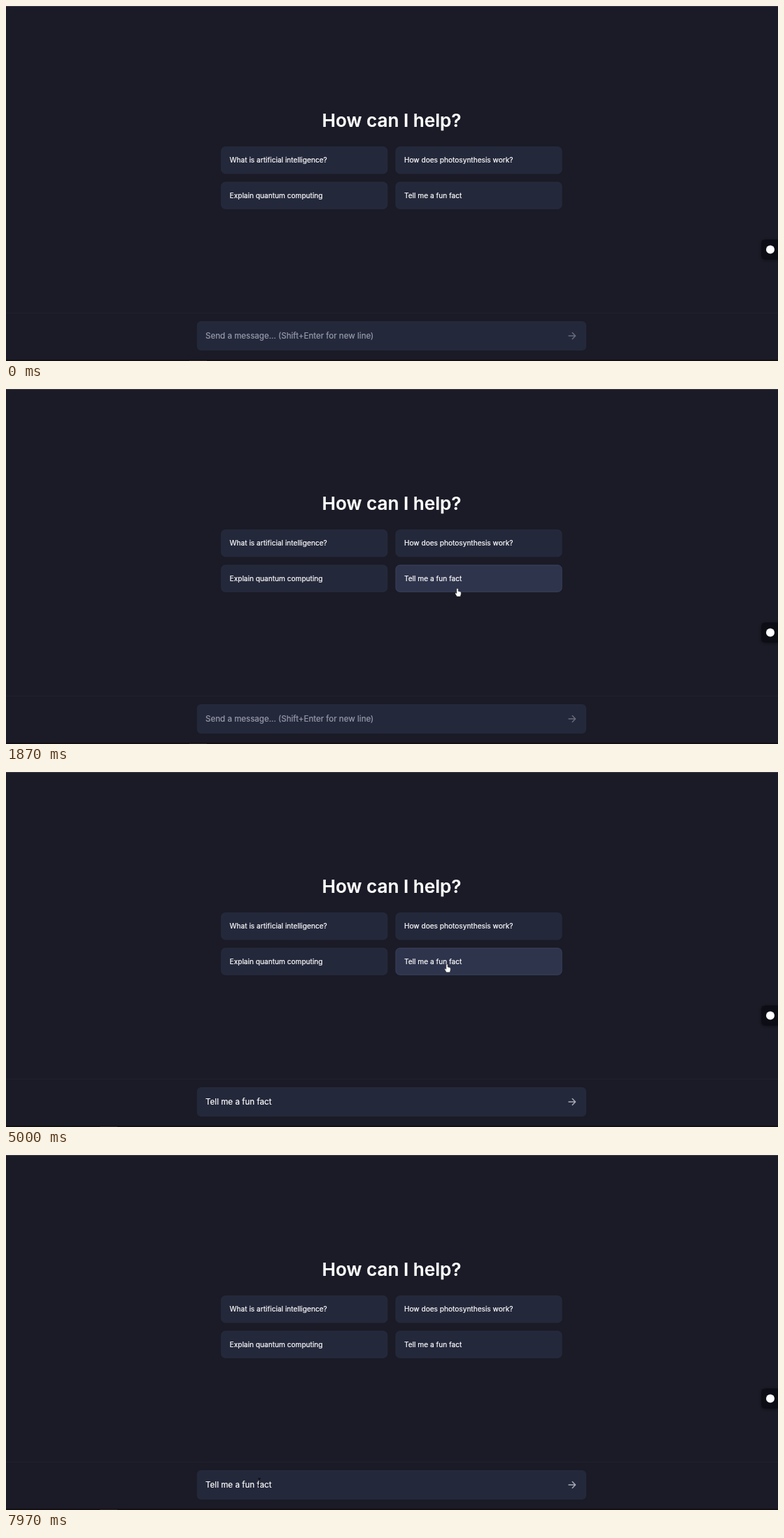
An HTML page for the animation above (8 s loop, 1103x508 px).

```html
<!DOCTYPE html>
<html lang="en">
<head>
<meta charset="utf-8">
<title>Chat start screen</title>
<style>
  html, body { margin: 0; width: 100%; height: 100%; overflow: hidden; background: #1a1b26; }
  svg { display: block; width: 1103px; height: 508px; }
  text {
    font: 11.6px Inter, sans-serif; color: #fff;
    fill: currentColor; stroke: currentColor; stroke-width: .2;
  }
  .card text { font-size: 10.15px; }
  .card rect { fill: #24283b; stroke: #292e42; stroke-width: .75; }
  .title { font-size: 26.1px; font-weight: 600; text-anchor: middle; }
</style>
</head>
<body>
<svg viewBox="0 0 1103 508">
  <defs>
    <filter id="soft" x="-50%" y="-50%" width="200%" height="200%">
      <feDropShadow dx="0" dy="1" stdDeviation="2.5" flood-color="#000" flood-opacity=".4"/>
    </filter>
  </defs>
  <rect width="1103" height="508" fill="#1a1b26"/>
  <rect width="1103" height="1" fill="#3d3e48"/>
  <rect y="439" width="1103" height="1" fill="#1f202b"/>
  <rect y="506" width="1103" height="2" fill="#140f14"/>
  <rect id="marker" y="507" width="25" height="1" fill="#2b2529"/>

  <text class="title" x="551" y="173">How can I help?</text>
  <g id="cards"></g>

  <rect x="272.7" y="451" width="556.4" height="42" rx="6" fill="#24283b"/>
  <text id="entry" x="285" y="476"></text>
  <path id="send" d="M804 472H813.4M809.2 467.6L813.6 472L809.2 476.4" fill="none"
        stroke-width="1.4" stroke-linecap="round" stroke-linejoin="round"/>

  <path d="M1103 334H1085Q1079 334 1079 340V357Q1079 363 1085 363H1103Z" fill="#111113" filter="url(#soft)"/>
  <circle cx="1092" cy="348.5" r="6" fill="#fff"/>

  <circle id="click" cx="630" cy="272.7" r="8.6" fill="#c4bd10" opacity=".82"/>
  <g id="cursor" stroke="#111" stroke-width=".5" stroke-linejoin="round" fill="#fff">
    <path id="arrow" d="M0 0V9.6L2.2 7.6L3.7 11L5.2 10.3L3.8 7H6.8Z"/>
    <path id="hand" d="M-1.2 .9Q0 -.6 1.2 .9V4.2L4.2 5Q5.2 5.4 5.2 6.4V8.6L4.2 12H-.8L-3.2 8Q-3.4 6.6 -2.3 6.6L-1.2 7.5Z"/>
    <path id="beam" d="M-2 -5.2H2M0 -5.2V5.2M-2 5.2H2" fill="none" stroke="#08090d" stroke-width="1"/>
  </g>
</svg>
<script>
const $ = id => document.getElementById(id);
const LOOP = 8000, STEP = 66.7;

const labels = ['What is artificial intelligence?', 'How does photosynthesis work?',
                'Explain quantum computing', 'Tell me a fun fact'];
$('cards').innerHTML = labels.map((label, i) => {
  const x = 307.6 + i % 2 * 249.3, y = 201.6 + (i >> 1) * 50.4;
  return `<g class="card"><rect x="${x}" y="${y}" width="237.2" height="38.2" rx="5.8"/>
    <text x="${x + 12}" y="${y + 22.8}">${label}</text></g>`;
}).join('');
const hoverRect = $('cards').lastElementChild.firstElementChild;

// Eased pointer moves: first step, last step, end point
const moves = [
  [5, 19, 769, 281], [19, 22, 752, 271.7], [22, 28, 645, 285],
  [30, 34, 638, 253], [36, 40, 630, 274.7], [75, 82, 446, 508],
  [102, 107, 390, 507], [107, 109, 8, 508], [109, 115, 190, 449], [115, 119, 362, 468]
];

const clamp = v => Math.max(0, Math.min(1, v));
const ease = u => u * u * (3 - 2 * u);
const mix = (a, b, u) => a + (b - a) * u;
const blend = (a, b, u) => `rgb(${a.map((v, i) => mix(v, b[i], u))})`;
const show = (id, on) => $(id).style.display = on ? '' : 'none';
const inside = (x, y, l, t, r, b) => x >= l && x <= r && y >= t && y <= b;

function pointer(k) {
  let x = 1045, y = 515;
  for (const [from, to, endX, endY] of moves) {
    const u = ease(clamp((k - from) / (to - from)));
    x = mix(x, endX, u);
    y = mix(y, endY, u);
  }
  return [x, y];
}

function draw(t) {
  const k = Math.floor(t / STEP + .3);
  const [x, y] = pointer(k);
  const onCard = inside(x, y, 557, 251, 795, 291);
  const onInput = inside(x, y, 273, 451, 829, 493);
  $('cursor').setAttribute('transform', `translate(${x} ${y})`);
  show('hand', onCard);
  show('beam', onInput);
  show('arrow', !onCard && !onInput);
  show('click', k >= 56 && k < 59);

  const hover = clamp((k - 19) / 3) - clamp((k - 75) / 4);
  hoverRect.style.fill = blend([36, 40, 59], [47, 52, 77], hover);
  hoverRect.style.stroke = blend([41, 46, 66], [65, 72, 104], hover);

  const filled = k >= 58;
  $('entry').textContent = filled ? labels[3] : 'Send a message... (Shift+Enter for new line)';
  $('entry').style.color = filled ? '#fff' : '#989cab';
  $('send').style.stroke = filled ? '#a9acb7' : '#686c7b';
  $('marker').setAttribute('x', filled ? 134 : 262);
}

function frame(now) {
  draw(now % LOOP);
  requestAnimationFrame(frame);
}
draw(0);
requestAnimationFrame(frame);
</script>
</body>
</html>
```
